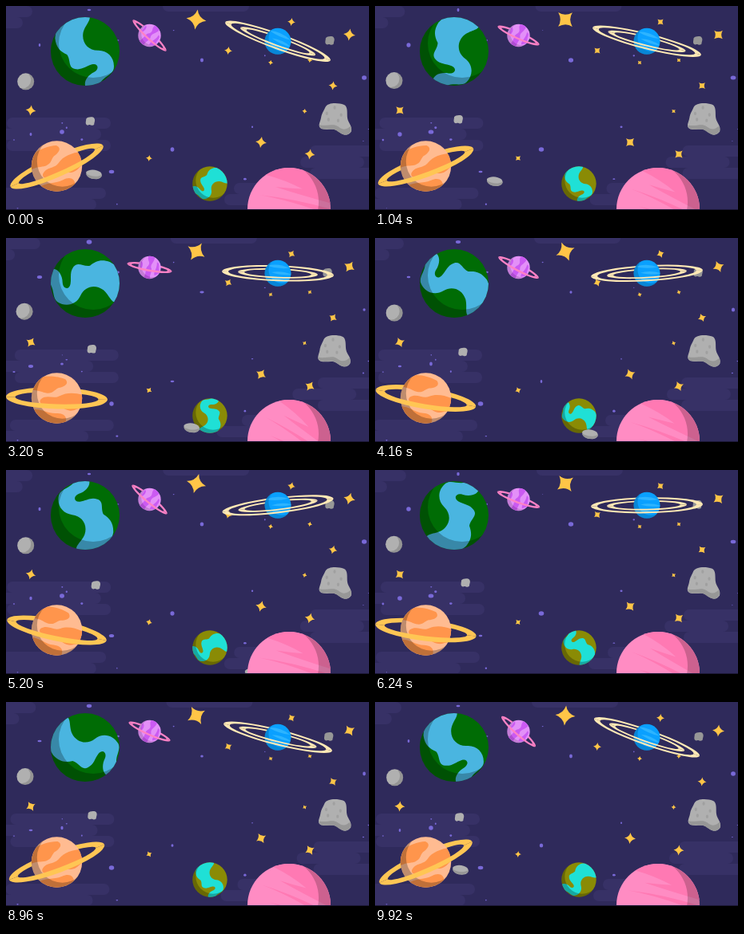
Recreate the animation shown at these times as an HTML page with a canvas. Size 454 by 256 pixels, loop 10000 ms.

```html
<!DOCTYPE html>
<html>
<head>
<meta charset="utf-8">
<style>
html, body { margin: 0; width: 100%; height: 100%; overflow: hidden; background: #2f2a5b; }
canvas { display: block; }
</style>
</head>
<body>
<canvas id="sky" width="454" height="256"></canvas>
<script>
const ctx = document.getElementById('sky').getContext('2d');
const TAU = Math.PI * 2;
const LOOP = 10;
const GREY = '#b0b0b0', DARK_GREY = '#979797';

// Oscillators: 1 at the start of the period, -1 halfway.
const wave = (t, period) => Math.cos(TAU * t / period);
const swing = (t, period) => Math.abs((t / period % 1) * 4 - 2) - 1;

function seeded(seed) {
  return () => (seed = seed * 16807 % 2147483647) / 2147483647;
}

function fill(path, color, rule = 'nonzero') {
  ctx.fillStyle = color;
  ctx.fill(path, rule);
}

function oval(x, y, rx, ry = rx) {
  const p = new Path2D();
  p.ellipse(x, y, rx, ry, 0, 0, TAU);
  return p;
}

function at(x, y, angle, draw) {
  ctx.save();
  ctx.translate(x, y);
  ctx.rotate(angle * TAU / 360);
  draw();
  ctx.restore();
}

// A disc with a turning surface under a fixed crescent of shade.
function planet({ x, y, r, base, land, surface, scale = 1, shade, dim = .25 }, angle = 0) {
  at(x, y, 0, () => {
    const disc = oval(0, 0, r);
    fill(disc, base);
    ctx.clip(disc);
    if (surface) at(0, 0, angle, () => {
      ctx.scale(scale, scale);
      fill(surface, land);
    });
    const crescent = oval(...shade, r);
    crescent.rect(-2 * r, -2 * r, 4 * r, 4 * r);
    fill(crescent, `rgba(0,0,0,${dim})`, 'evenodd');
  });
}

function halfRing({ x, y, ringColor, bands }, angle, front) {
  at(x, y, angle, () => {
    ctx.beginPath();
    ctx.rect(-90, front ? 0 : -40, 180, 40);
    ctx.clip();
    for (const [rx, ry, innerX, innerY] of bands) {
      const band = oval(0, 0, rx, ry);
      band.addPath(oval(0, 0, innerX, innerY));
      fill(band, ringColor, 'evenodd');
    }
  });
}

function ringed(body, angle) {
  halfRing(body, angle, false);
  planet(body, angle);
  halfRing(body, angle, true);
}

const continent = new Path2D(`M-46-16C-36-20-34-10-24-4C-12 2 0-4 3-16C6-28 18-34 30-29
  C38-25 36-12 46-6V10C38 14 30 6 28-4C26-12 18-12 18-4C18 4 22 10 18 18
  C14 26 6 20-2 23C-8 30-14 34-26 32L-46 24Z`);

const earth = { x: 99, y: 57, r: 43, base: '#006c05', land: '#4ab5e0', surface: continent, shade: [10, -10] };
const olive = { x: 255, y: 223, r: 21.7, base: '#8a8b05', land: '#1fe0d6', surface: continent, scale: .5, shade: [4, -4] };
const pink = {
  x: 354, y: 255, r: 52, base: '#ff8cc3', land: '#ff79b3', shade: [-15, -9], dim: .2,
  surface: new Path2D(`M-34-40Q-8-36 14-27Q-4-26-20-26Q8-20 56-12V-56H-20Z
    M-40-14Q0-12 60 4V-4Q10-14-40-14ZM-24 4Q10 4 60 20V10Q20 0-24 4Z`)
};
const orange = {
  x: 63.5, y: 201, r: 31.7, base: '#ffbb91', land: '#ff954c', shade: [7, -6],
  ringColor: '#ffc654', bands: [[63.5, 13.5, 52, 7.5]],
  surface: new Path2D(`M-34-20C-20-30 0-28 10-24C16-18 8-14 2-13C-4-10-4-6-12-6C-20-7-22-10-34-9Z
    M-20 2C-12-5-4 2 4-3C12-8 24-8 36-4V12C26 10 24 16 16 15C8 14 6 9-4 10C-14 11-24 8-20 2Z
    M-34 16C-20 12-12 20 0 19C10 18 16 24 10 34H-20Z`)
};
const violet = {
  x: 179.5, y: 37, r: 14.2, base: '#e390f8', land: '#cb5af2', shade: [4, -2], dim: .14,
  ringColor: '#ff82c6', bands: [[28.5, 5, 23, 2.6]],
  surface: new Path2D(`M-3-16C-6-8 1-8-2-2C-6 2-2 6-5 14L3 14C1 8 5 4 2 0C0-5 6-8 4-16Z
    M8-8C13-8 10 0 14 4L8 9C5 5 10 0 8-8ZM-12-6C-8-6-8 2-11 5Z`)
};
const azure = {
  x: 340, y: 44.3, r: 16.5, base: '#0aa0ff', land: '#2db4ff', shade: [5, -4], dim: .16,
  ringColor: '#ffe9b5', bands: [[70, 10, 62, 8], [50, 6.2, 42, 4.4]],
  surface: new Path2D('M-14-9Q0-13 14-7Q0-5-14-9ZM-8-1Q4-4 18 1Q4 3-8-1ZM-16 6Q-4 4 8 9Q-6 11-16 6Z')
};
const moon = { r: 10.5, base: GREY, shade: [-4, -2], dim: .16 };

const star = new Path2D('M0-1Q.16-.24 1 0Q.24.16 0 1Q-.16.24-1 0Q-.24-.16 0-1Z');
const boulder = new Path2D(`M-13-15C-10-22 4-21 10-19C16-17 14-8 15-2C16 4 22 8 20 15
  C16 21 10 20 4 15C-2 10-8 14-17 12C-23 9-19 4-18-2C-17-8-15-10-13-15Z`);
const boulderShade = new Path2D('M-20 7C-10 9-2 4 4 9C10 14 15 12 19 8C22 14 18 19 12 19C4 17 2 12-4 12C-10 12-19 14-20 7Z');
const pebble = new Path2D('M-5-3C-3-6 4-6 5-4C7-1 5 1 5 4C2 7 0 3-3 5C-7 4-5 0-5-3Z');
const drifter = new Path2D('M-10-2C-6-7 4-6 8-3C12 1 9 5 4 6C-3 7-10 4-10-2Z');
const drifterShade = new Path2D('M-10 0C-4 3 4 4 10 0C10 5 4 6 0 6C-5 6-9 4-10 0Z');

// Stars: x, y, size.
const stars = [
  [238, 17, 12.5], [278, 56, 5], [357, 20, 5], [429.5, 36, 7.5], [409, 100, 5.5], [373.5, 132, 3],
  [31, 131, 6.5], [319, 171, 7], [380, 186, 6.5], [179, 191, 4], [331, 71, 3], [380, 68, 3]
];
const bigDots = [[42, 49], [245, 68], [208, 180], [448, 90], [31, 161], [104, 5], [132, 208], [70, 158]];

const random = seeded(77);
const dots = bigDots.map(([x, y]) => ({ x, y, size: 2.8, phase: random() * 3 }));
for (let i = 0; i < 14; i++)
  dots.push({ x: random() * 454, y: random() * 256, size: .8 + random(), phase: random() * 3 });

// Each bank is a stack of rounded bars that slide against each other.
const banks = [
  { x: 0, y: 0, width: 66, rows: 2 }, { x: 250, y: -7, width: 108, rows: 1 },
  { x: 66, y: 140, width: 130, rows: 3 }, { x: 60, y: 228, width: 130, rows: 2 },
  { x: 420, y: 175, width: 80, rows: 3 }, { x: 330, y: 222, width: 90, rows: 2 }
];

function drawClouds(t) {
  const bars = new Path2D();
  for (const { x, y, width, rows } of banks)
    for (let row = 0; row < rows; row++) {
      const side = row % 2 ? 1 : -1;
      const center = x + side * (6 * wave(t, 5) - 6) - 12 * (row % 2);
      bars.roundRect(center - width / 2, y + 14 * row, width, 14, 7);
    }
  fill(bars, '#373166');
}

function drawDots(t) {
  for (const { x, y, size, phase } of dots) {
    const turn = Math.PI * t / 5 + phase;
    const rx = size * (.45 + .75 * Math.abs(Math.sin(turn)));
    const ry = size * (.4 + .6 * Math.abs(Math.cos(turn - 1)));
    fill(oval(x, y, rx, ry), '#7969d8');
  }
}

function drawStars(t) {
  for (const [x, y, size] of stars)
    at(x, y, 8 + 36 * t, () => {
      ctx.scale(size, size);
      fill(star, '#ffc547');
    });
}

function drawRocks(t) {
  const sway = wave(t, 5);
  planet({ ...moon, x: 23.7 + sway, y: 93.2 + 1.6 * sway });
  at(108.5 - 4.5 * wave(t - 1.2, LOOP), 141.5 + 3.2 * sway, 0, () => fill(pebble, GREY));
  at(403 + 1.8 * sway, 43.5, 0, () => fill(pebble, DARK_GREY));
  at(411 + sway, 142.5, sway, () => {
    fill(boulder, GREY);
    fill(boulderShade, DARK_GREY);
    for (let i = 0; i < 5; i++)
      fill(oval(9 * Math.cos(i * 2.4) - 2, 9 * Math.sin(i * 2.4) - 6, 1.6, 2.2), '#a0a0a0');
  });
}

function drawDrifter(t) {
  const s = t > 8.5 ? t - LOOP : t;
  at(110 + 38.2 * s, 211 + 8.4 * s, 4, () => {
    fill(drifter, GREY);
    fill(drifterShade, DARK_GREY);
  });
}

function frame() {
  const t = performance.now() / 1000 % LOOP;
  ctx.fillStyle = '#2f2a5b';
  ctx.fillRect(0, 0, 454, 256);
  drawClouds(t);
  drawDots(t);
  drawStars(t);
  drawRocks(t);
  planet(earth, 75 + 36 * t);
  ringed(violet, 20 + 23 * swing(t, 5));
  ringed(azure, 6 + 14 * swing(t, LOOP));
  planet(olive, 180 * swing(t, LOOP) - 24);
  drawDrifter(t);
  ringed(orange, -6 - 18 * wave(t, LOOP));
  planet(pink, 20 - 14 * swing(t, 5));
  ctx.fillStyle = '#1b1736';
  ctx.fillRect(0, 255, 454, 1);
  requestAnimationFrame(frame);
}

frame();
</script>
</body>
</html>
```
